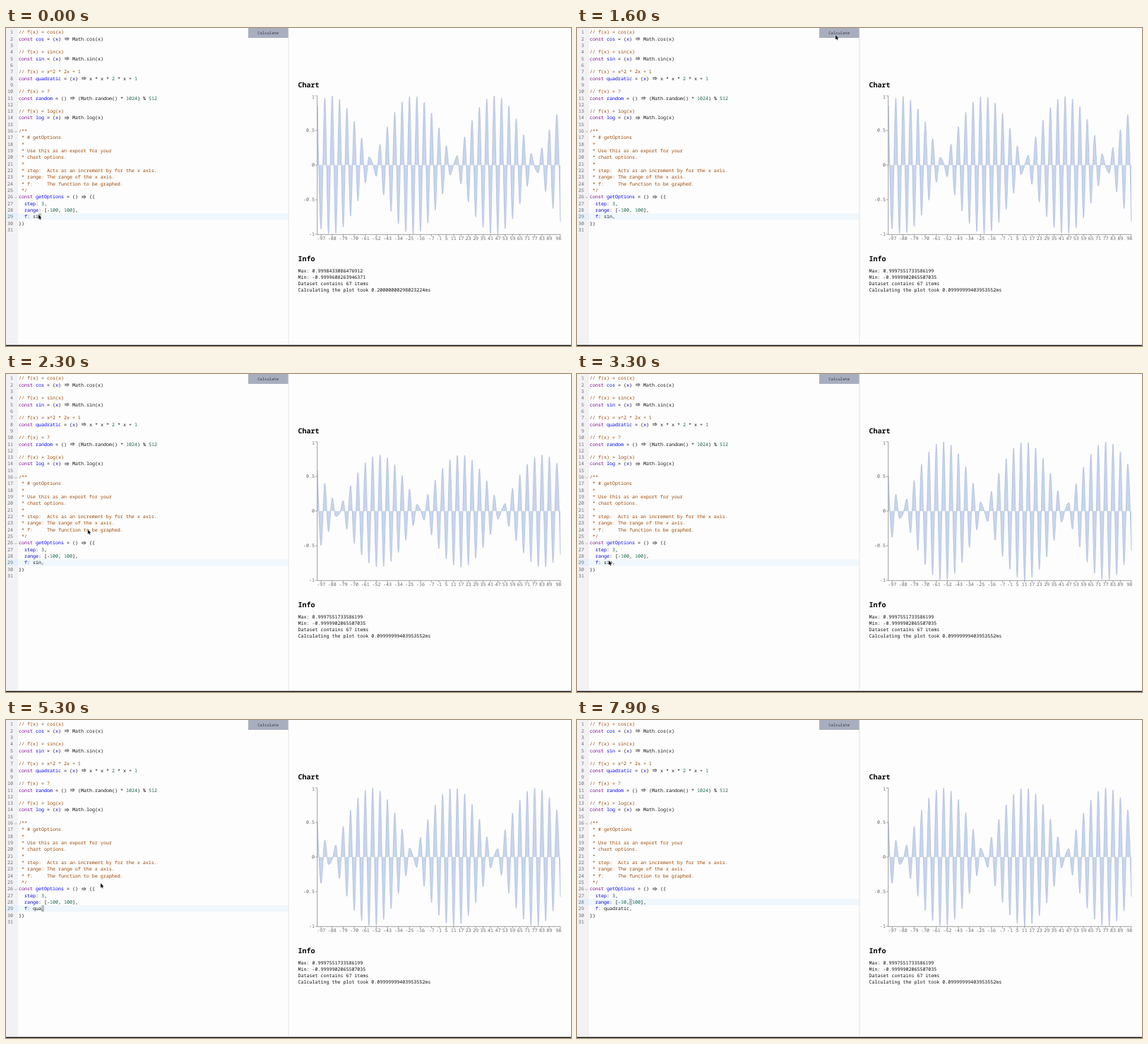
An HTML page with a canvas that plays this animation: 800x450 px, repeating every 8000 ms.

```html
<!DOCTYPE html>
<html lang="en">
<head>
<meta charset="utf-8">
<title>Function plotter</title>
<style>
  html, body { margin: 0; width: 100%; height: 100%; overflow: hidden; background: #fdfdfd; }
  canvas { display: block; width: 800px; height: 450px; }
</style>
</head>
<body>
<canvas id="stage" width="800" height="450"></canvas>
<script>
const ctx = document.getElementById('stage').getContext('2d');
const LOOP = 8000;
const MONO = '"Noto Sans Mono", "DejaVu Sans Mono", monospace';
const SIZE = 6.67, CELL = 4, ROW = 9.32, TOP = 1.2, LEFT = 18;

const CODE = `// f(x) = cos(x)
const cos = (x) => Math.cos(x)

// f(x) = sin(x)
const sin = (x) => Math.sin(x)

// f(x) = x^2 * 2x + 1
const quadratic = (x) => x * x * 2 * x + 1

// f(x) = ?
const random = () => (Math.random() * 1024) % 512

// f(x) = log(x)
const log = (x) => Math.log(x)

/**
 * # getOptions
 *
 * Use this as an export for your
 * chart options.
 *
 * step:  Acts as an increment by for the x axis.
 * range: The range of the x axis.
 * f:     The function to be graphed.
 */
const getOptions = () => ({
  step: 3,
  range: [-LOW, 100],
  f: FN,
})
`.split('\n');

// time, lower bound, function name, caret line, caret column
const EDITS = [
  [0, '100', 'si', 29, 7],
  [200, '100', 'sin', 29, 8],
  [3450, '100', 'sin', 29, 8],
  [4550, '100', 'si', 29, 7],
  [4650, '100', 's', 29, 6],
  [4750, '100', '', 29, 5],
  [4900, '100', 'q', 29, 6],
  [5050, '100', 'qu', 29, 7],
  [5200, '100', 'qua', 29, 8],
  [5500, '100', 'quad', 29, 9],
  [5700, '100', 'quadr', 29, 10],
  [5850, '100', 'quadra', 29, 11],
  [6000, '100', 'quadrat', 29, 12],
  [6300, '100', 'quadrati', 29, 13],
  [6400, '100', 'quadratic', 29, 14],
  [6600, '100', 'quadratic', 28, 14],
  [7250, '10', 'quadratic', 28, 13],
  [7500, '1', 'quadratic', 28, 12],
  [7650, '10', 'quadratic', 28, 13],
  [7850, '10', 'quadratic', 28, 14]
];

// time, x, y
const MOUSE = [
  [0, 46, 264], [300, 46, 264], [600, 200, 165], [900, 350, 48], [1200, 366, 10],
  [1880, 366, 10], [2300, 116, 220], [2700, 49, 262], [3100, 45, 264],
  [3450, 45, 264], [3750, 60, 32], [3950, 70, 66], [4280, 134, 231]
];
const MOUSE_HIDES = 6400;

const BLUR = 1400, FOCUS = 3450;
const CLICK = 1500, MORPH = 1580, MORPH_TIME = 1500;

const xs = Array.from({ length: 67 }, (_, i) => -100 + 3 * i);
const cosines = xs.map(Math.cos), sines = xs.map(Math.sin);
const plotX = v => 441 + (v + 100) / 198 * 344;
const plotY = v => 194 - v * 98;

function rect(x, y, w, h, color) {
  ctx.fillStyle = color;
  ctx.fillRect(x, y, w, h);
}

function text(str, x, y, color, size = SIZE, align = 'left', weight = 400) {
  ctx.font = `${weight} ${size}px ${MONO}`;
  ctx.textAlign = align;
  ctx.fillStyle = color;
  ctx.fillText(str, x, y);
}

function line(points, color, width) {
  ctx.beginPath();
  points.forEach(([x, y]) => ctx.lineTo(x, y));
  ctx.strokeStyle = color;
  ctx.lineWidth = width;
  ctx.stroke();
}

function arrow(x, y) {
  const mid = y - 2.3;
  line([[x + 1, mid - 0.9], [x + 6, mid - 0.9]], '#222', 0.7);
  line([[x + 1, mid + 0.9], [x + 6, mid + 0.9]], '#222', 0.7);
  line([[x + 4.7, mid - 2.2], [x + 7.2, mid], [x + 4.7, mid + 2.2]], '#222', 0.7);
}

function tokenColor(tok, prev, rest) {
  if (tok === 'const') return '#770088';
  if (prev === 'const') return '#0000ff';
  if (/^\d/.test(tok)) return '#116644';
  if (/^\w/.test(tok) && rest[0] === ':') return '#0000cc';
  if (tok === 'x' && rest.startsWith(') =>')) return '#0000ff';
  return '#111';
}

function codeLine(str, y) {
  if (/^(\/| \*)/.test(str)) {
    text(str, LEFT, y, '#994400');
    return;
  }
  let prev = '';
  for (const m of str.matchAll(/=>|\w+|[^\w\s]/g)) {
    const tok = m[0], x = LEFT + m.index * CELL;
    if (tok === '=>') arrow(x, y);
    else text(tok, x, y, tokenColor(tok, prev, str.slice(m.index + tok.length)));
    prev = tok;
  }
}

function editor(t) {
  const [since, low, fn, row, col] = EDITS.filter(e => e[0] <= t).pop();
  const rowTop = TOP + (row - 1) * ROW;

  rect(0, 0, 17, 448, '#f2f1f3');
  rect(0, rowTop, 17, ROW, '#e4f0fb');
  rect(17, rowTop, 383, ROW, '#f0f7fd');

  CODE.forEach((raw, i) => {
    const y = TOP + i * ROW + 7.1;
    text(i + 1, 10, y, '#6c6c6c', SIZE, 'right');
    codeLine(raw.replace('LOW', low).replace('FN', fn), y);
  });
  for (const n of [16, 26]) {
    const y = TOP + (n - 1) * ROW + 5;
    line([[12.2, y], [13.8, y + 1.5], [15.4, y]], '#888', 0.6);
  }

  const focused = t < BLUR || t >= FOCUS;
  if (focused && (t - since) % 1200 < 600) {
    rect(LEFT + col * CELL, rowTop, CELL, ROW, 'rgba(120,120,120,0.42)');
  }

  rect(343, 0, 57, 14, '#a9aebf');
  text('Calculate', 371.2, 9.2, '#333845', 5.56, 'center');
}

// cubic-bezier(.25, .1, .25, 1)
function ease(p) {
  if (p <= 0) return 0;
  if (p >= 1) return 1;
  const curve = (s, a, b) => 3 * a * s * (1 - s) ** 2 + 3 * b * s * s * (1 - s) + s ** 3;
  let lo = 0, hi = 1;
  for (let i = 0; i < 24; i++) {
    const mid = (lo + hi) / 2;
    if (curve(mid, 0.25, 0.25) < p) lo = mid; else hi = mid;
  }
  return curve(lo, 0.1, 1);
}

// Monotone cubic through evenly spaced points
function monotone(px, py) {
  const last = px.length - 1, h = px[1] - px[0];
  const s = py.slice(1).map((y, i) => (y - py[i]) / h);
  const m = py.map((_, i) => {
    if (i === 0 || i === last) return 0;
    const a = s[i - 1], b = s[i];
    return (Math.sign(a) + Math.sign(b)) *
      Math.min(Math.abs(a), Math.abs(b), Math.abs(a + b) / 4);
  });
  m[0] = (3 * s[0] - m[1]) / 2;
  m[last] = (3 * s[last - 1] - m[last - 1]) / 2;
  const path = new Path2D();
  path.moveTo(px[0], py[0]);
  for (let i = 0; i < last; i++) {
    path.bezierCurveTo(
      px[i] + h / 3, py[i] + m[i] * h / 3,
      px[i + 1] - h / 3, py[i + 1] - m[i + 1] * h / 3,
      px[i + 1], py[i + 1]);
  }
  return path;
}

function chart(t) {
  text('Chart', 413.5, 84.2, '#000', 10, 'left', 700);

  const k = ease((t - MORPH) / MORPH_TIME);
  const curve = monotone(xs.map(plotX), xs.map((_, i) => plotY(cosines[i] + (sines[i] - cosines[i]) * k)));
  const area = new Path2D(curve);
  area.lineTo(plotX(98), plotY(0));
  area.lineTo(plotX(-100), plotY(0));
  area.closePath();
  ctx.fillStyle = '#c7d6ec';
  ctx.fill(area);
  ctx.strokeStyle = '#a8b5dc';
  ctx.lineWidth = 0.7;
  ctx.stroke(curve);

  line([[440.7, 96], [440.7, 292.3], [785, 292.3]], '#777', 0.7);
  for (const v of [1, 0.5, 0, -0.5, -1]) {
    const y = plotY(v);
    line([[437.5, y], [441, y]], '#777', 0.6);
    text(v, 437, (v === 1 ? y + 2 : y) + 2.4, '#666', SIZE, 'right');
  }
  for (let v = -97; v <= 98; v += v < -7 || v === 89 ? 9 : 6) {
    const x = plotX(v);
    line([[x, 292], [x, 295]], '#777', 0.6);
    text(v, Math.min(x, 782.3), 299.8, '#666', SIZE, 'center');
  }
}

function info(t) {
  const done = t >= CLICK, data = done ? sines : cosines;
  text('Info', 413.5, 329.9, '#000', 10, 'left', 700);
  [
    `Max: ${Math.max(...data)}`,
    `Min: ${Math.min(...data)}`,
    `Dataset contains ${data.length} items`,
    `Calculating the plot took ${done ? '0.09999999403953552' : '0.20000000298023224'}ms`
  ].forEach((s, i) => text(s, 413.5, 346.4 + i * 8.75, '#111'));
}

function pointer(t) {
  if (t >= MOUSE_HIDES) return;
  const n = MOUSE.findIndex(p => p[0] > t);
  let [, x, y] = MOUSE[MOUSE.length - 1];
  if (n > 0) {
    const [t0, x0, y0] = MOUSE[n - 1], [t1, x1, y1] = MOUSE[n];
    const p = (t - t0) / (t1 - t0);
    x = x0 + (x1 - x0) * p;
    y = y0 + (y1 - y0) * p;
  }
  ctx.beginPath();
  for (const [dx, dy] of [[0, 0], [0, 6.2], [1.5, 5], [2.5, 7.3], [3.4, 6.9], [2.5, 4.7], [4.4, 4.5]]) {
    ctx.lineTo(x + dx, y + dy);
  }
  ctx.closePath();
  ctx.strokeStyle = '#fff';
  ctx.lineWidth = 1;
  ctx.stroke();
  ctx.fillStyle = '#000';
  ctx.fill();
}

function draw(now) {
  const t = Math.max(0, now - start) % LOOP;
  ctx.textRendering = 'geometricPrecision';
  rect(0, 0, 800, 450, '#fdfdfd');
  editor(t);
  rect(399.5, 0, 1, 448, '#e4e4e8');
  chart(t);
  info(t);
  rect(0, 448.6, 800, 1.4, '#111');
  pointer(t);
  requestAnimationFrame(draw);
}

const start = performance.now();
draw(start);
</script>
</body>
</html>
```
